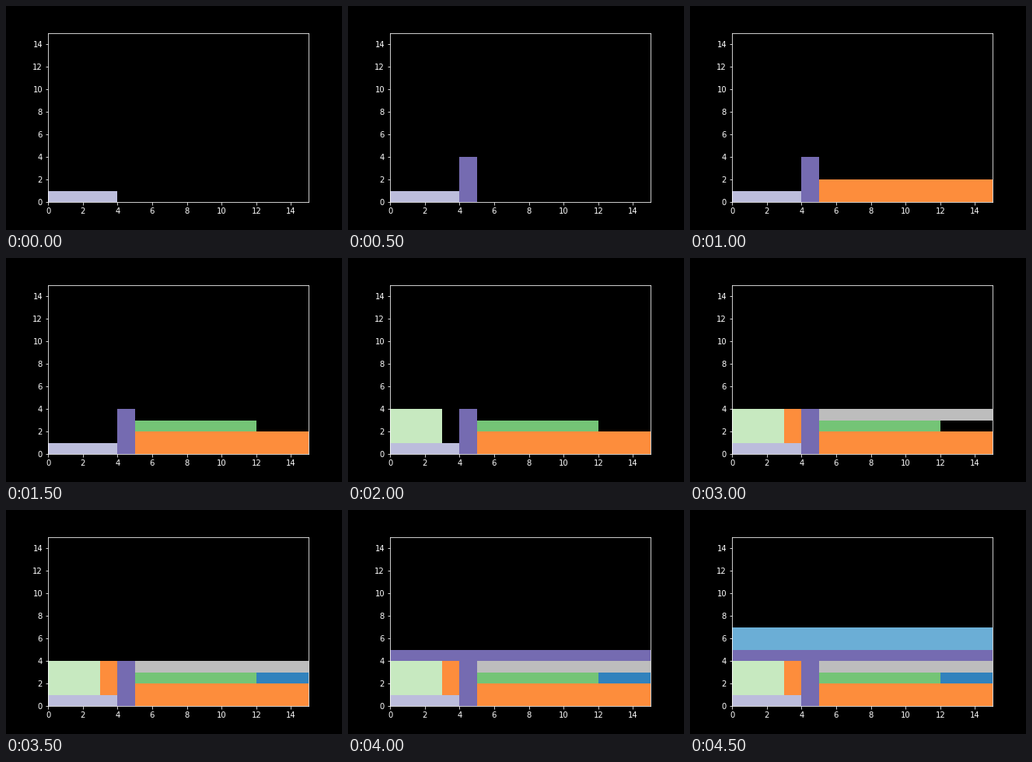
Animation, 432 px wide and 288 px high, one loop 5000 ms. Source, as a matplotlib script:

```python
import matplotlib.pyplot as plt
from matplotlib.animation import FuncAnimation
from matplotlib.patches import Rectangle

STEP_MS = 500
SIZE = 15

# x, y, width, height, colour, in order of placement
BLOCKS = [
    (0, 0, 4, 1, "#bcbddc"),
    (4, 0, 1, 4, "#756bb1"),
    (5, 0, 10, 2, "#fd8d3c"),
    (5, 2, 7, 1, "#74c476"),
    (0, 1, 3, 3, "#c7e9c0"),
    (3, 1, 1, 3, "#fd8d3c"),
    (5, 3, 10, 1, "#bdbdbd"),
    (12, 2, 3, 1, "#3182bd"),
    (0, 4, 15, 1, "#756bb1"),
    (0, 5, 15, 2, "#6baed6"),
]

plt.style.use("dark_background")
plt.rcParams["font.family"] = "DejaVu Sans"
plt.rcParams["font.size"] = 10

fig = plt.figure(figsize=(6, 4), dpi=72)
ax = fig.add_axes([0.125, 0.125, 0.775, 0.755])
ax.set(xlim=(0, SIZE), ylim=(0, SIZE))
ax.set_xticks(range(0, SIZE, 2))
ax.set_yticks(range(0, SIZE, 2))

patches = [
    ax.add_patch(Rectangle((x, y), w, h, facecolor=color, linewidth=0))
    for x, y, w, h, color in BLOCKS
]


def update(frame):
    for i, patch in enumerate(patches):
        patch.set_visible(i <= frame)
    return patches


anim = FuncAnimation(fig, update, frames=len(BLOCKS), interval=STEP_MS,
                     repeat=True, repeat_delay=0, blit=False)
plt.show()
```
